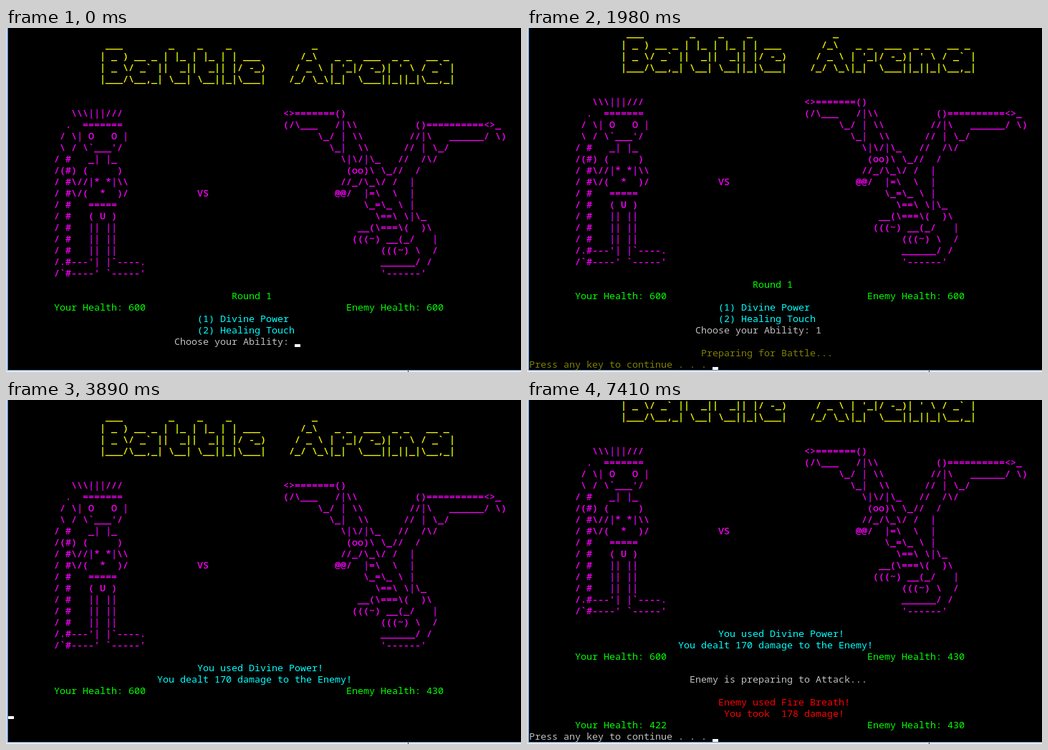
Write an HTML page that moves like this. It is 719 px wide and 482 px high and loops after 8000 ms.

```html
<!DOCTYPE html>
<html lang="en">
<head>
<meta charset="utf-8">
<title>Battle Arena</title>
<style>
  html, body { margin: 0; width: 719px; height: 482px; overflow: hidden; background: #000; }
  #stage { position: relative; width: 719px; height: 482px; overflow: hidden; background: #000; }
  #screen { position: absolute; left: 3px; top: 0; width: 716px; height: 479px; overflow: hidden; }
  .line {
    position: absolute; white-space: pre;
    font: 13.3333px/16px "Noto Sans Mono", "DejaVu Sans Mono", monospace;
    font-variant-ligatures: none; height: 16px;
  }
  .art { -webkit-text-stroke: .25px currentColor; }
  /* Vertical bars sit between two pixels: one tint on each side. */
  .bar {
    background: linear-gradient(90deg, var(--l) 50%, var(--r) 50%) 0 0 / 8px 100%;
    -webkit-background-clip: text; background-clip: text;
    color: transparent; -webkit-text-stroke: .7px transparent;
  }
  #cursor { position: absolute; width: 8px; height: 4px; background: #fff; }
  .edge { position: absolute; }
  #left { left: 0; top: 0; width: 2px; height: 480px; background: #c6d8ee; }
  #rim { left: 2px; top: 0; width: 717px; height: 480px; box-sizing: border-box; border: solid #5b86bd; border-width: 0 0 1px 1px; }
  #bottom { left: 0; top: 480px; width: 719px; height: 2px; background: #e8e8e8; }
  #tick { left: 561px; top: 480px; width: 1px; height: 2px; background: #333; }
</style>
</head>
<body>
<div id="stage">
  <div id="screen"></div>
  <div id="left" class="edge"></div>
  <div id="rim" class="edge"></div>
  <div id="bottom" class="edge"></div>
  <div id="tick" class="edge"></div>
</div>

<script type="text/plain" id="title">
 ___        _    _    _              _
| _ ) __ _ | |_ | |_ | | ___       /_\   _ _  ___  _ _   __ _
| _ \/ _` ||  _||  _|| |/ -_)     / _ \ | '_|/ -_)| ' \ / _` |
|___/\__,_| \__| \__||_|\___|    /_/ \_\|_|  \___||_||_|\__,_|
</script>

<script type="text/plain" id="hero">
   \\\|||///
  .  =======
 / \| O   O |
 \ / \`___'/
/ #   _| |_
/(#) (     )
/ #\//|* *|\\
/ #\/(  *  )/
/ #   =====
/ #   ( U )
/ #   || ||
/ #   || ||
/ #   || ||
/.#---'| |`----.
/`#----' `-----'
</script>

<script type="text/plain" id="dragon">
<>=======()
(/\___   /|\\          ()==========<>_
      \_/ | \\        //|\   ______/ \)
        \_|  \\      // | \_/
          \|\/|\_   //  /\/
           (oo)\ \_//  /
          //_/\_\/ /  |
         @@/  |=\  \  |
              \_=\_ \ |
                \==\ \|\_
             __(\===\(  )\
            (((~) __(_/   |
                 (((~) \  /
                 ______/ /
                 '------'
</script>

<script>
const CELL_W = 8, CELL_H = 16, TOP = -1, LOOP = 8000;
const YELLOW = '#ffff00', MAGENTA = '#ff00ff', GREEN = '#00ff00', CYAN = '#00ffff',
      GREY = '#c0c0c0', OLIVE = '#808000', RED = '#ff0000';
// Left and right tint of a vertical bar.
const BARS = {
  [YELLOW]: ['#70f000', '#ffb000'],
  [MAGENTA]: ['#5000ff', '#ff0060']
};

const text = (row, col, color, str) => ({ row, col, color, str });

function art(id, row, col, color) {
  const rows = document.getElementById(id).textContent.replace(/^\n|\n$/g, '').split('\n');
  return rows.map((str, i) => text(row + i, col, color, str));
}

const health = (row, mine, enemy) => [
  text(row, 8, GREEN, 'Your Health: ' + mine),
  text(row, 59, GREEN, 'Enemy Health: ' + enemy)
];
const pressKey = (row, color) => text(row, 0, color, 'Press any key to continue . . .');

const arena = [
  ...art('title', 1, 16, YELLOW),
  ...art('hero', 7, 8, MAGENTA),
  ...art('dragon', 7, 48, MAGENTA),
  text(14, 33, MAGENTA, 'VS')
];
const ask = [
  ...arena,
  text(23, 39, GREEN, 'Round 1'),
  ...health(24, 600, 600),
  text(25, 33, CYAN, '(1) Divine Power'),
  text(26, 33, CYAN, '(2) Healing Touch'),
  text(27, 29, GREY, 'Choose your Ability:')
];
const chosen = [...ask, text(27, 50, GREY, '1')];
const prepare = [...chosen, text(29, 30, OLIVE, 'Preparing for Battle...'), pressKey(30, OLIVE)];
const strike = [
  ...arena,
  text(23, 33, CYAN, 'You used Divine Power!'),
  text(24, 26, CYAN, 'You dealt 170 damage to the Enemy!'),
  ...health(25, 600, 430)
];
const threat = [...strike, text(27, 28, GREY, 'Enemy is preparing to Attack...')];
const counter = [
  ...threat,
  text(29, 33, RED, 'Enemy used Fire Breath!'),
  text(30, 34, RED, 'You took  178 damage!'),
  ...health(31, 422, 430),
  pressKey(32, GREY)
];

// [start ms, lines, rows scrolled, cursor column and screen row]
const steps = [
  [0, ask, 0, [50, 27]],
  [150, ask, 0],
  [580, chosen, 0],
  [1180, chosen, 0, [51, 27]],
  [1730, chosen, 0],
  [1980, prepare, 1, [32, 29]],
  [2660, prepare, 1],
  [3220, prepare, 1, [32, 29]],
  [3770, prepare, 2, [0, 29]],
  [3890, strike, 0, [0, 27]],
  [4860, strike, 0],
  [5420, threat, 0, [0, 28]],
  [6420, threat, 0],
  [6980, threat, 0, [0, 28]],
  [7410, counter, 3, [32, 29]]
];

const screenEl = document.getElementById('screen');

function lineEl({ row, col, color, str }, scroll) {
  const el = document.createElement('div');
  const bar = BARS[color];
  el.className = bar ? 'line art' : 'line';
  el.style.cssText = `left:${col * CELL_W}px;top:${(row - scroll) * CELL_H + TOP}px;color:${color}`;
  if (bar) {
    el.style.setProperty('--l', bar[0]);
    el.style.setProperty('--r', bar[1]);
  }
  for (const run of str.match(/\|+|[^|]+/g)) {
    const span = document.createElement('span');
    span.textContent = run;
    if (run[0] === '|') span.className = 'bar';
    el.append(span);
  }
  return el;
}

function draw([, lines, scroll, cursor]) {
  const nodes = lines.filter(l => l.row >= scroll).map(l => lineEl(l, scroll));
  if (cursor) {
    const el = document.createElement('div');
    el.id = 'cursor';
    el.style.left = cursor[0] * CELL_W + 'px';
    el.style.top = cursor[1] * CELL_H + TOP + 12 + 'px';
    nodes.push(el);
  }
  screenEl.replaceChildren(...nodes);
}

let shown = null;
const start = performance.now();

function tick() {
  const t = Math.max(0, performance.now() - start) % LOOP;
  const step = steps.findLast(s => s[0] <= t);
  if (step !== shown) draw(shown = step);
  requestAnimationFrame(tick);
}
tick();
</script>
</body>
</html>
```
